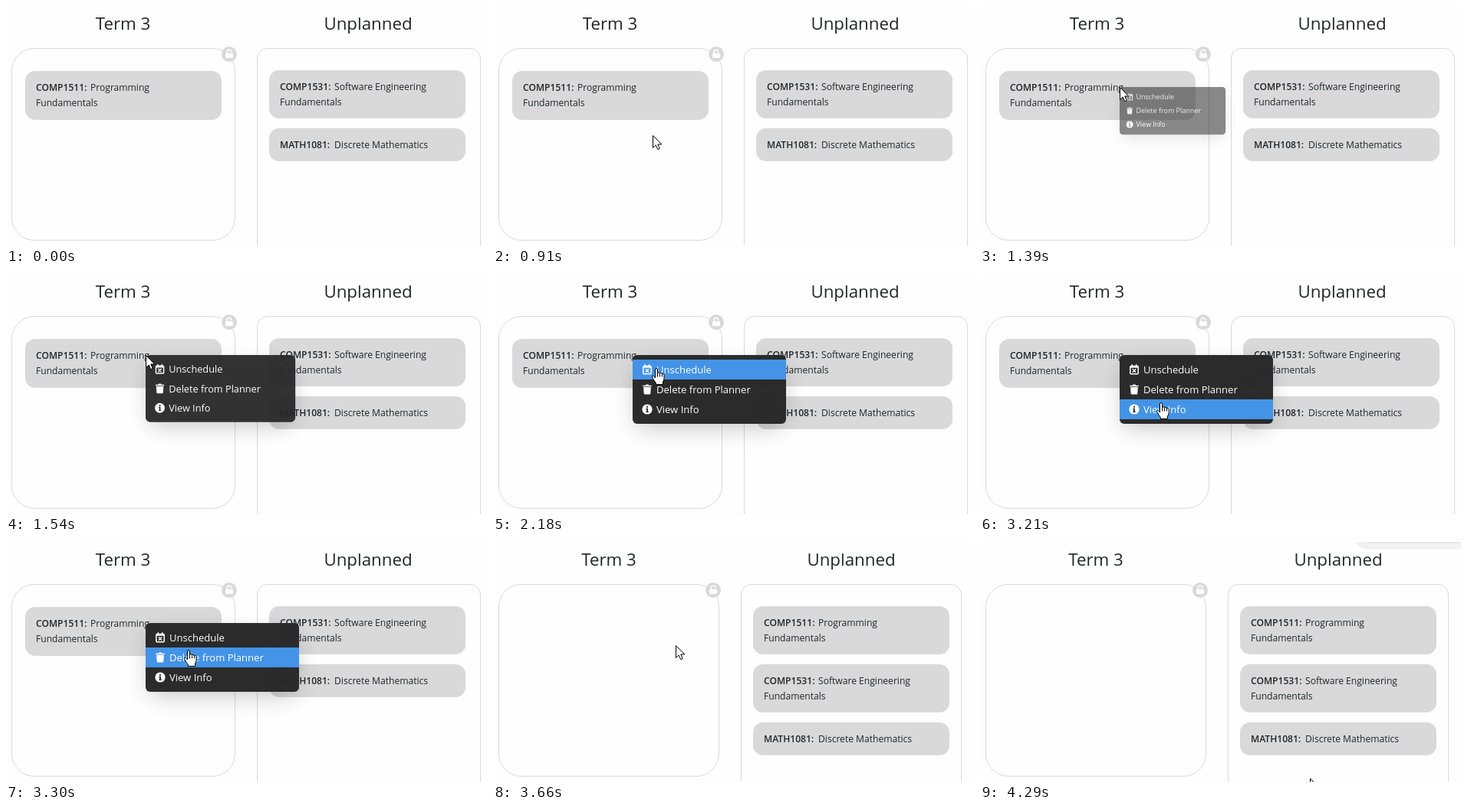
Recreate the animation shown at these times as an HTML page. Size 627 by 314 pixels, loop 4650 ms.

```html
<!DOCTYPE html>
<html lang="en">
<head>
<meta charset="utf-8">
<title>Term planner</title>
<style>
  html, body { margin: 0; width: 100%; height: 100%; overflow: hidden; background: #fefefe; }
  svg { display: block; width: 627px; height: 314px; cursor: default; }
  text { font: 12.1px "Open Sans", "Noto Sans", sans-serif; fill: #212529; white-space: pre; }
  .title { font-size: 22.3px; text-anchor: middle; }
  .code { font-weight: 600; }
  .card rect, .lock circle { fill: #d9d9d9; }
  .panel { fill: none; stroke: #d9d9d9; }
  #menu text { font-size: 13.05px; font-weight: 500; fill: #fff; }
  .line { fill: none; stroke: #fff; stroke-width: 1.5; stroke-linecap: round; }
  .ink { fill: #fff; stroke: #000; stroke-linejoin: round; }
</style>
</head>
<body>
<svg viewBox="0 0 627 314">
  <defs>
    <filter id="soft" x="-40%" y="-80%" width="180%" height="260%">
      <feGaussianBlur stdDeviation="15"/>
    </filter>
  </defs>

  <g id="page"></g>

  <g id="toast">
    <rect x="488" y="-40" width="180" height="51" rx="16" fill="#f1f1f1"/>
    <rect x="499" y="-40" width="170" height="43" rx="9" fill="#e4e4e4"/>
  </g>

  <g id="menu">
    <rect x="5" y="15" width="190" height="80" rx="6" fill="#000" opacity=".22" filter="url(#soft)"/>
    <rect width="200" height="90" rx="6" fill="#282828" opacity=".98"/>
    <rect id="hover" width="200" height="26" fill="#4393e6"/>
    <g transform="translate(19 19)">
      <rect class="line" x="-5.2" y="-4.5" width="10.4" height="10.2" rx="1.2"/>
      <path class="line" d="M-2.7-6.2v2M2.7-6.2v2M-4.8-2.9h9.6M-1.7-.2l3.4 3.4M1.7-.2l-3.4 3.4"/>
    </g>
    <g transform="translate(19 45)" fill="#fff">
      <path d="M-5.7-5.2h3.4l.8-1.3h3l.8 1.3h3.4v1.5H-5.7z"/>
      <path d="M-4.9-2.9h9.8l-.6 8.2q-.1 1.2-1.3 1.2h-6q-1.2 0-1.3-1.2z"/>
    </g>
    <g transform="translate(19 71)">
      <circle r="6.6" fill="#fff"/>
      <circle cy="-3.2" r="1.15" fill="#282828"/>
      <path d="M-1.7-1.3H.9v4h.9v1.2h-3.5V2.7h.8V-.1h-.8z" fill="#282828"/>
    </g>
    <text x="31" y="23.8">Unschedule</text>
    <text x="31" y="49.8">Delete from Planner</text>
    <text x="31" y="75.8">View Info</text>
  </g>

  <g id="cursor">
    <path id="arrow" class="ink" d="M.5.5V16.5l3.7-3.5 2.5 5.7 2.6-1.1-2.5-5.6h5z"/>
    <g id="hand">
      <path class="ink" d="M-1.5 13V2Q-1.5.5 0 .5T1.5 2V7Q1.8 5.6 3.1 5.7T4.5 7.3Q4.9 6.2 6 6.4T7.4 8Q7.9 7.2 8.9 7.6T10 9.3V14Q10 16 8.5 18V21.5H-.7V19.3Q-3 17-4.6 13.6-6.2 11.3-5 10.5T-2.8 11.4z"/>
      <path d="M1.5 7v4.5M4.5 7.3v4.2M7.4 8v3.5" stroke="#000"/>
    </g>
    <path id="move" class="ink" d="M0-10.3l3.8 4H1.2v5.1h5.1v-2.6l4 3.8-4 3.8V1.2H1.2v5.1h2.6L0 10.3l-3.8-4h2.6V1.2h-5.1v2.6l-4-3.8 4-3.8v2.6h5.1v-5.1h-2.6z"/>
  </g>
</svg>

<script>
const LOOP = 4650, STEP = 30;
const MENU = { x: 182, y: 106, open: 1280, openTime: 340, close: 3360, closeTime: 300 };
const DROP_AT = 3390;

const COURSES = {
  intro: ["COMP1511:", "Programming", "Fundamentals"],
  software: ["COMP1531:", "Software Engineering", "Fundamentals"],
  maths: ["MATH1081:", "Discrete Mathematics"]
};

// time, x, y of the pointer's hot spot
const PATH = [
  [760, 248, 275], [850, 226, 212], [940, 199, 148], [1060, 182, 106],
  [1720, 182, 106], [1930, 211, 122],
  [2150, 211, 122], [2480, 236, 143],
  [2600, 236, 143], [2720, 236, 162], [2780, 236, 171],
  [3180, 236, 171], [3300, 238, 135],
  [3810, 238, 135], [4050, 325, 215], [4290, 440, 318]
];

const $ = id => document.getElementById(id);
const clamp = v => Math.min(1, Math.max(0, v));
const mix = (a, b, k) => a + (b - a) * k;

// CSS "ease" curve
function ease(p) {
  const curve = (a, b, u) => 3 * a * u * (1 - u) ** 2 + 3 * b * u * u * (1 - u) + u ** 3;
  let lo = 0, hi = 1;
  for (let i = 0; i < 24; i++) {
    const mid = (lo + hi) / 2;
    if (curve(.25, .25, mid) < p) lo = mid; else hi = mid;
  }
  return curve(.1, 1, lo);
}

function card([code, name, more], x, y, height = more ? 63 : 43) {
  return `<g class="card" transform="translate(${x} ${y})">
    <rect width="256" height="${height}" rx="13"/>
    <text class="code" x="14" y="26">${code}</text>
    <text x="85" y="26">${name}</text>
    ${more ? `<text x="14" y="46">${more}</text>` : ""}</g>`;
}

function lock(x) {
  return `<g class="lock" transform="translate(${x} 63)">
    <circle r="10"/>
    <rect x="-5" y="-1.2" width="10" height="6.2" rx="1" fill="#fff"/>
    <path class="line" d="M-2.8-1.2V-3a2.8 2.8 0 0 1 5.6 0"/></g>`;
}

function page(dropped) {
  const right = dropped ? 323 : 327;
  const width = dropped ? 287 : 291;
  const x = right + 16;
  const { intro, software, maths } = COURSES;
  const cards = dropped
    ? card(intro, x, 84) + card(software, x, 160) + card(maths, x, 236)
    : card(intro, 25, 85, 64) + card(software, x, 84) + card(maths, x, 160);
  return `<text class="title" x="${dropped ? 151 : 152.5}" y="31">Term 3</text>
    <text class="title" x="${dropped ? 467 : 472}" y="31">Unplanned</text>
    <rect class="panel" x="7.5" y="55.5" width="${width}" height="251" rx="29.5"/>
    <rect class="panel" x="${right + .5}" y="55.5" width="${width}" height="300" rx="13.5"/>
    ${lock(dropped ? 287 : 291)}${cards}`;
}

function pointerAt(t) {
  const i = PATH.findIndex(p => p[0] > t);
  if (i < 1) return null;
  const [t0, x0, y0] = PATH[i - 1], [t1, x1, y1] = PATH[i];
  const k = (t - t0) / (t1 - t0);
  return [Math.round(mix(x0, x1, k)), Math.round(mix(y0, y1, k))];
}

function show(id, on) {
  $(id).style.display = on ? "" : "none";
}

let layout = null;

function draw(now) {
  const t = Math.floor((now % LOOP - 10) / STEP) * STEP + 10;

  const dropped = t >= DROP_AT;
  if (dropped !== layout) {
    $("page").innerHTML = page(dropped);
    layout = dropped;
  }

  const opened = ease(clamp((t - MENU.open) / MENU.openTime));
  const closed = ease(clamp((t - MENU.close) / MENU.closeTime));
  const shown = t < MENU.close ? opened : 1 - closed;
  show("menu", shown > .005);
  $("menu").setAttribute("transform", `translate(${MENU.x} ${MENU.y}) scale(${mix(.3, 1, shown)})`);
  $("menu").setAttribute("opacity", shown);

  const at = pointerAt(t);
  const live = t >= 1750 && t < MENU.close;
  const row = at && live ? Math.floor((at[1] - MENU.y - 6) / 26) : -1;
  const onItem = row >= 0 && row < 3;
  show("hover", onItem);
  $("hover").setAttribute("y", 6 + row * 26);

  show("cursor", at);
  if (at) {
    const onCard = t < 1210 && at[1] < 149;
    $("cursor").setAttribute("transform", `translate(${at})`);
    show("hand", onItem);
    show("move", onCard);
    show("arrow", !onItem && !onCard);
  }

  const slide = clamp((t - 4140) / 150);
  show("toast", slide > 0);
  $("toast").setAttribute("transform", `translate(0 ${mix(-12, 0, slide)})`);
}

let start = null;
function tick(now) {
  if (start === null) start = now;
  draw(now - start);
  requestAnimationFrame(tick);
}
draw(0);
requestAnimationFrame(tick);
</script>
</body>
</html>
```
